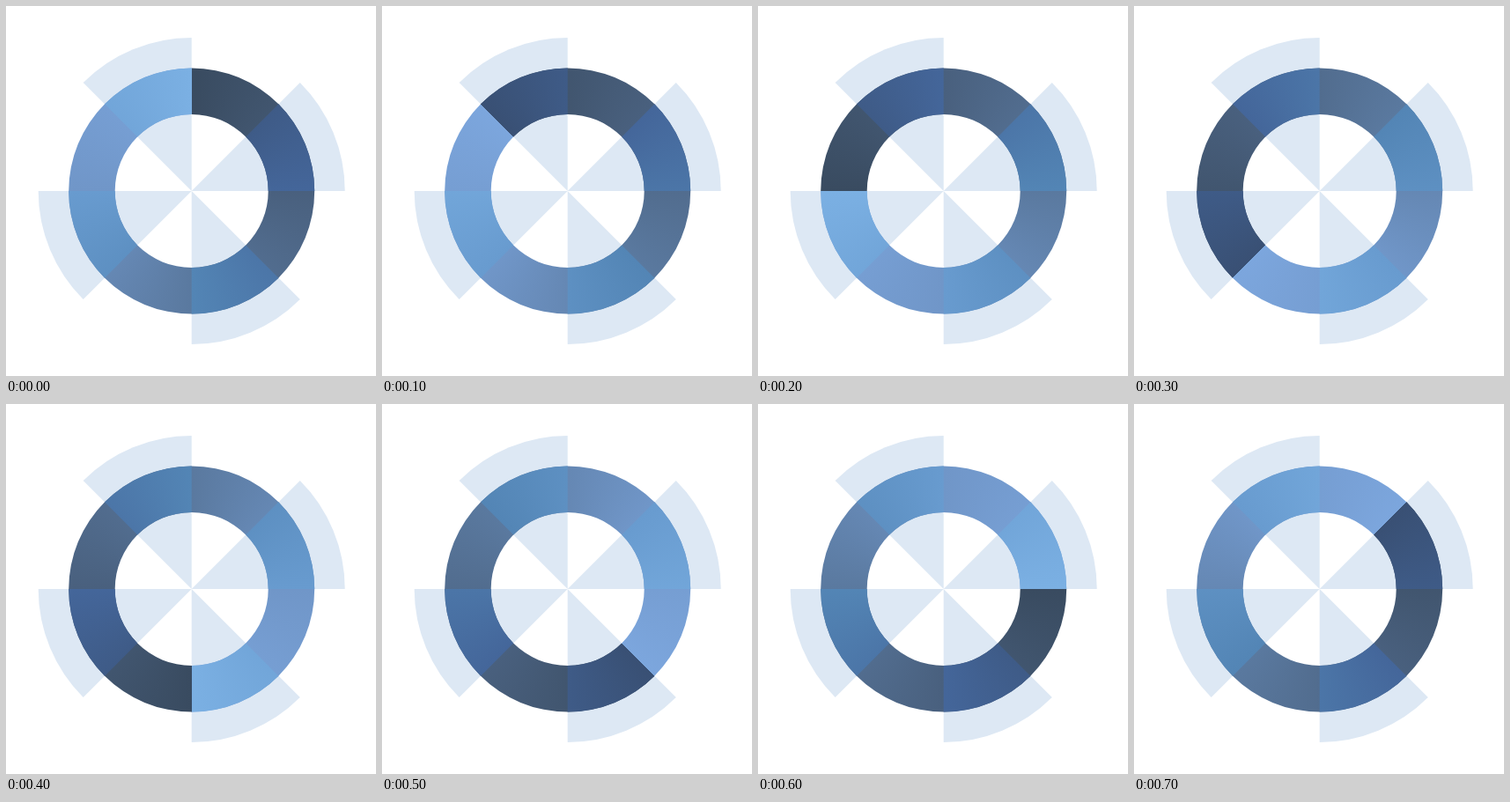
An HTML page with a canvas that plays this animation: 420 by 420 pixels, repeating every 800 ms.

```html
<!DOCTYPE html>
<html>
<head>
<meta charset="utf-8">
<style>
html, body { margin: 0; height: 100%; overflow: hidden; background: #fff; }
canvas { display: block; }
</style>
</head>
<body>
<canvas id="stage" width="420" height="420"></canvas>
<script>
const ctx = document.getElementById('stage').getContext('2d');
const CX = 210.7, CY = 210, INNER = 87, OUTER = 139.5, BLADE = 174;
const STEP = Math.PI / 4, TOP = -Math.PI / 2;
const PLAIN = ['#394b60', '#49607e', '#5a799f', '#7096c8', '#7ca6dd'];
const TINTED = ['#395074', '#44669a', '#5385b5', '#689bcf', '#7bb0e3'];

function sweep(start, colors) {
  const g = ctx.createConicGradient(start, CX, CY);
  colors.forEach((c, i) => g.addColorStop(i / (colors.length - 1), c));
  return g;
}

// Annular sector; an inner radius of 0 gives a full wedge
function sector(inner, outer, from, to, fill) {
  ctx.beginPath();
  ctx.arc(CX, CY, outer, from, to);
  ctx.arc(CX, CY, inner, to, from, true);
  ctx.fillStyle = fill;
  ctx.fill();
}

function blades(inner, outer, fill) {
  for (let i = 1; i < 8; i += 2) {
    const a = TOP + i * STEP;
    sector(inner, outer, a, a + STEP, fill);
  }
}

function draw(now) {
  const start = TOP - Math.floor(now / 100) % 8 * STEP;
  ctx.fillStyle = '#fff';
  ctx.fillRect(0, 0, 420, 420);
  blades(0, BLADE, '#dde8f4');
  sector(INNER, OUTER, 0, 2 * Math.PI, sweep(start, PLAIN));
  blades(INNER, OUTER, sweep(start, TINTED));
  requestAnimationFrame(draw);
}

draw(performance.now());
</script>
</body>
</html>
```
